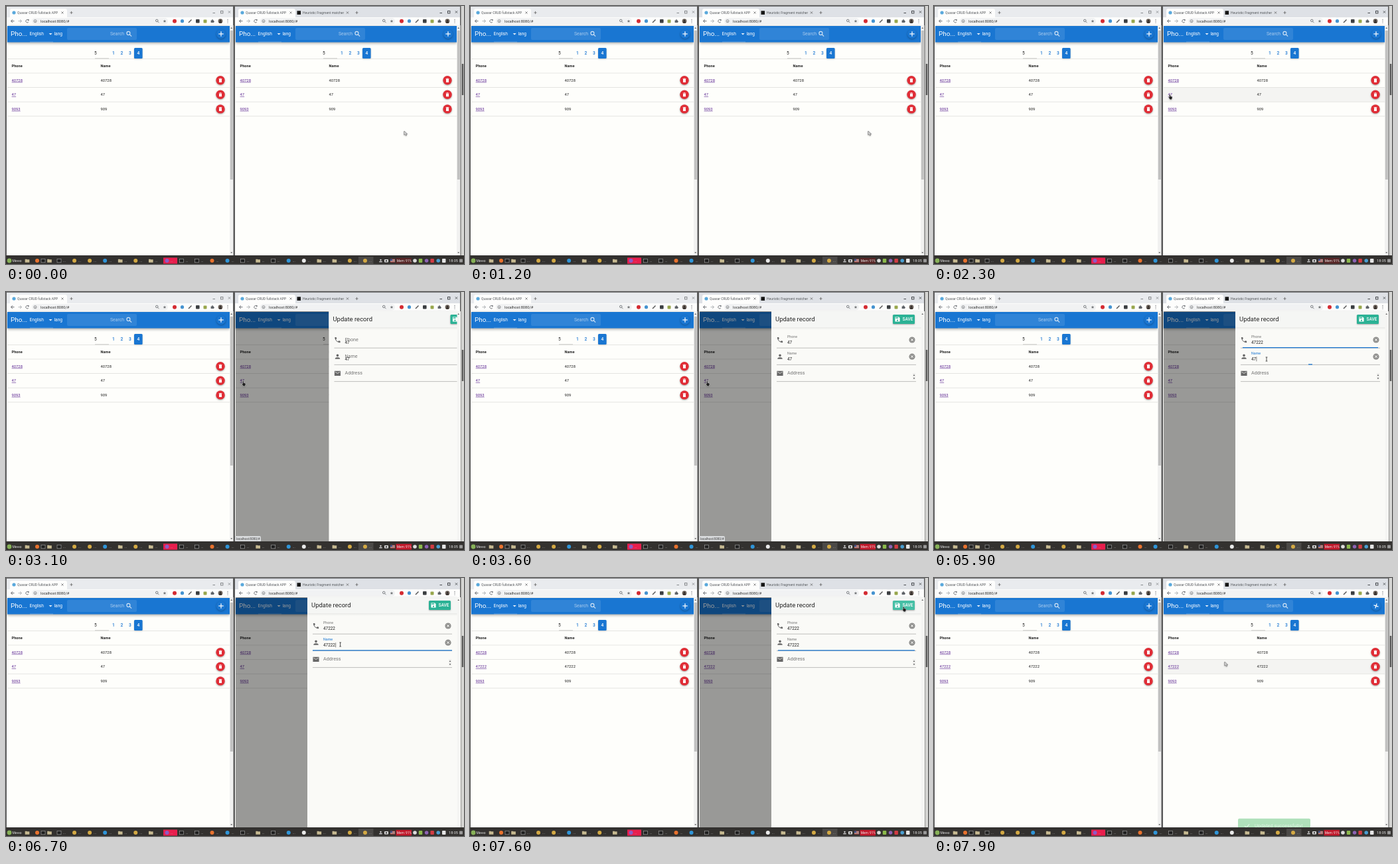
Animation of 690x388 px, one loop 8000 ms. Source, as an HTML page with a canvas:

```html
<!DOCTYPE html>
<html lang="en">
<head>
<meta charset="utf-8">
<title>CRUD demo</title>
<style>
  html, body { margin: 0; width: 100%; height: 100%; overflow: hidden; background: #33312f; }
  canvas { display: block; width: 690px; height: 388px; }
</style>
</head>
<body>
<canvas id="stage"></canvas>
<script>
const W = 690, H = 388, LOOP = 8000;
const BLUE = '#1976d2', PAPER = '#fefefb', DRAWER = '#fafaf7', RED = '#e02d36', GREY = '#757575', DIM = '#646464';
const canvas = document.getElementById('stage');
const c = canvas.getContext('2d');
const dpr = window.devicePixelRatio || 1;
canvas.width = W * dpr;
canvas.height = H * dpr;

const ICONS = {
  trash: 'M6 7h12v14H6zM5 4h3.5l1-1h5l1 1H19v2H5z',
  phone: 'M3 4q0-1 1-1h3.5q1 0 1 1 0 2 .6 3.6 .3 .6-.3 1l-2.2 2.2q2.2 4.4 6.6 6.6l2.2-2.2q.5-.5 1-.3 1.7 .6 3.6 .6 1 0 1 1V20q0 1-1 1C11 21 3 13 3 4z',
  person: 'M8 8a4 4 0 1 0 8 0 4 4 0 1 0-8 0zM4 20v-2c0-5 16-5 16 0v2z',
  mail: 'M2 4h20v16H2zM4 6v2l8 5 8-5V6l-8 5z',
  save: 'M3 3h14l4 4v14H3zM5 5v4h10V5zM9 16a3 3 0 1 0 6 0 3 3 0 1 0-6 0z',
  star: 'M12 3l2.7 6 6.6.7-5 4.4 1.5 6.4L12 17l-5.8 3.5 1.5-6.4-5-4.4 6.6-.7z',
  puzzle: 'M3 8h6V6a3 3 0 0 1 6 0v2h5v5a3 3 0 0 1 0 6v2H3z',
  folder: 'M2 5h8l2 2h10v13H2z',
  arrow: 'M0 0V15L3.7 11.6 6 17 8.6 15.8 6.2 10.6H11z',
  hand: 'M4 0q2 0 2 2v5l7 2v5l-2 5H5L0 11q1-2 3 0V2q0-2 1-2z'
};
for (const name in ICONS) ICONS[name] = new Path2D(ICONS[name]);

const clamp = v => Math.max(0, Math.min(1, v));
const ramp = (t, start, length) => clamp((t - start) / length);
const smooth = p => p * p * (3 - 2 * p);
const easeOut = p => 1 - (1 - p) ** 3;

function rect(x, y, w, h, color, r = 0) {
  c.fillStyle = color;
  c.beginPath();
  c.roundRect(x, y, w, h, r);
  c.fill();
}
function circle(x, y, r, color) {
  c.fillStyle = color;
  c.beginPath();
  c.arc(x, y, r, 0, 7);
  c.fill();
}
function stroke(points, color, width = 1) {
  c.strokeStyle = color;
  c.lineWidth = width;
  c.beginPath();
  points.forEach(([x, y]) => c.lineTo(x, y));
  c.stroke();
}
function ring(x, y, r, color, width = 0.8, from = 0, to = 7) {
  c.strokeStyle = color;
  c.lineWidth = width;
  c.beginPath();
  c.arc(x, y, r, from, to);
  c.stroke();
}
function text(s, x, y, size, color, weight = 400, align = 'left') {
  c.font = `${weight} ${size}px Roboto, sans-serif`;
  c.textAlign = align;
  c.textBaseline = 'middle';
  c.fillStyle = color;
  c.fillText(s, x, y + size * 0.04);
}
function icon(name, x, y, size, color) {
  c.save();
  c.translate(x - size / 2, y - size / 2);
  c.scale(size / 24, size / 24);
  c.fillStyle = color;
  c.fill(ICONS[name], 'evenodd');
  c.restore();
}
function shadowed(blur, alpha, draw) {
  c.save();
  c.shadowColor = `rgba(0,0,0,${alpha})`;
  c.shadowBlur = blur * dpr;
  c.shadowOffsetY = dpr;
  draw();
  c.restore();
}
function cross(x, y, r, color, width = 0.8) {
  stroke([[x - r, y - r], [x + r, y + r]], color, width);
  stroke([[x - r, y + r], [x + r, y - r]], color, width);
}
function plus(x, y, r, color, width) {
  stroke([[x - r, y], [x + r, y]], color, width);
  stroke([[x, y - r], [x, y + r]], color, width);
}
function magnifier(x, y, r, color, width) {
  ring(x - r * 0.3, y - r * 0.3, r * 0.7, color, width);
  stroke([[x + r * 0.2, y + r * 0.2], [x + r, y + r]], color, width);
}
function clipped(x, y, w, h, draw) {
  c.save();
  c.beginPath();
  c.rect(x, y, w, h);
  c.clip();
  draw();
  c.restore();
}

// Left-anchored parts shift by ox, right-anchored ones by rx.
function chrome(ox, rx, active) {
  const ink = active ? '#45484c' : '#85888b';
  rect(ox + 1, 0, 341 + rx - ox, 375, PAPER);
  rect(ox + 1, 1, 341 + rx - ox, 16, active ? '#dee1e6' : '#e9ebee');
  rect(ox + 1, 0, 341 + rx - ox, 1, '#77787a');
  rect(ox + 6, 4, 86, 14, '#fdfdfc', [3, 3, 0, 0]);
  circle(ox + 12, 10, 2.6, '#5aa9dc');
  text('Quasar CRUD fullstack APP', ox + 17, 10, 5, '#55585c');
  cross(ox + 85, 10, 1.6, '#777');
  if (active) {
    rect(438.5, 7.3, 5.6, 5.6, '#151515');
    clipped(447, 4, 62, 13, () => text('Heuristic Fragment matcher v', 447, 10, 5, '#55585c'));
    cross(514.5, 10, 1.6, DIM);
  }
  plus(active ? 528.5 : 98.5, 10, 2.1, DIM, 0.8);
  stroke([[rx + 311.5, 10.5], [rx + 315, 10.5]], ink);
  c.strokeRect(rx + 323.5, 7.5, 3.4, 3.4);
  cross(rx + 336.5, 9, 1.7, ink);

  rect(ox + 1, 17, 341 + rx - ox, 12, '#fdfdfc');
  [[10, -1, '#5f6368'], [21, 1, '#a8abae']].forEach(([x, d, color]) => {
    x += ox;
    stroke([[x - 2.5, 22.7], [x + 2.5, 22.7]], color, 0.9);
    stroke([[x, 20.3], [x + d * 2.5, 22.7], [x, 25.1]], color, 0.9);
  });
  ring(ox + 32, 22.7, 2.2, '#5f6368', 0.9, 0.5, 5.7);
  rect(ox + 32.9, 20.2, 1.7, 1.7, '#5f6368');
  rect(ox + 39, 18, 205 + rx - ox, 9.6, '#f1f2f3', 5);
  ring(ox + 44, 22.7, 2.1, '#6a6d70', 0.7);
  rect(ox + 43.7, 22, 0.7, 2, '#6a6d70');
  text('localhost:8080/#', ox + 52, 22.8, 5.7, '#333');
  magnifier(rx + 228, 22.7, 2.5, '#5f6368', 0.8);
  icon('star', rx + 239, 22.7, 6, '#77797c');
  circle(rx + 254, 22.7, 3, '#d42b32');
  circle(rx + 265.5, 22.7, 2.6, '#4593d0');
  stroke([[rx + 275, 25], [rx + 279.5, 20.5]], '#555', 1.4);
  rect(rx + 286, 20, 5.6, 5.6, '#3c3f42', 1);
  rect(rx + 297.5, 20.5, 5, 5, '#97a64c', 1);
  icon('puzzle', rx + 311, 22.5, 6.4, '#5f6368');
  circle(rx + 323, 22.7, 3.4, '#71675f');
  circle(rx + 323, 21.7, 1.2, '#302b28');
  rect(rx + 321, 23.3, 4, 2.2, '#302b28', 1);
  [20.4, 22.7, 25].forEach(y => circle(rx + 334, y, 0.6, '#5f6368'));
}

function page(ox, rx, rows, hovered, spin, scrollbar) {
  const left = ox + 2, width = 335 + rx - ox;
  shadowed(4, 0.35, () => rect(left, 30, width, 24.5, BLUE));
  text('Pho...', ox + 7, 42, 9.9, '#fff');
  text('English', ox + 35.5, 42, 6.6, '#fff');
  stroke([[ox + 36, 54], [ox + 71, 54]], 'rgba(255,255,255,.45)', 0.6);
  c.fillStyle = '#e6eff9';
  c.beginPath();
  c.moveTo(ox + 64.6, 41); c.lineTo(ox + 69.6, 41); c.lineTo(ox + 67.1, 43.6);
  c.fill();
  text('lang', ox + 72.5, 42, 6.6, '#fff');
  rect(ox + 92, 33, 105, 18, 'rgba(255,255,255,.1)', 2);
  text('Search', ox + 157, 42, 6.9, '#a9cbed');
  magnifier(ox + 185.5, 42, 3.6, '#d6e6f6', 1.1);
  shadowed(3, 0.3, () => circle(rx + 324, 42, 7, BLUE));
  c.save();
  c.translate(rx + 324, 42);
  c.rotate(spin);
  plus(0, 0, 3.7, '#fff', 1.2);
  c.restore();

  text('5', ox + 133, 71, 6.5, '#222');
  stroke([[ox + 134, 79], [ox + 155, 79]], '#9b9b99', 0.7);
  ['1', '2', '3'].forEach((n, i) => text(n, ox + 161.8 + i * 12.5, 71, 6.7, BLUE, 500, 'center'));
  shadowed(2, 0.25, () => rect(ox + 193, 63, 12.6, 16, BLUE, 1.5));
  text('4', ox + 199.3, 71, 6.7, '#fff', 500, 'center');

  text('Phone', ox + 8.6, 90, 5.6, '#222', 700);
  text('Name', ox + 142.6, 90, 5.6, '#222', 700);
  rows.forEach(([phone, name], i) => {
    const y = 111.7 + i * 21.6;
    if (i === hovered) rect(left, y - 10.8, width, 21.6, '#f4f4f2');
    text(phone, ox + 8.6, y, 5.8, '#5a2391');
    const w = c.measureText(phone).width;
    stroke([[ox + 8.6, y + 3.1], [ox + 8.6 + w, y + 3.1]], '#5a2391', 0.6);
    text(name, ox + 142.6, y, 5.8, '#222');
    shadowed(2.5, 0.35, () => circle(rx + 323, y, 6.7, RED));
    icon('trash', rx + 323, y, 8, '#fff');
  });
  [79.5, 101, 122.5, 144.2, 165.7].forEach(y => stroke([[left, y], [left + width, y]], '#dcdcd9', 0.7));
  if (scrollbar) {
    rect(rx + 337, 29, 5.5, 346, '#f1f1f0');
    rect(rx + 337.8, 37, 4, 224, '#c1c1c0');
    scrollArrow(rx + 339.7, 33, -1);
    scrollArrow(rx + 339.7, 371, 1);
  }
}
function scrollArrow(x, y, d) {
  c.fillStyle = DIM;
  c.beginPath();
  c.moveTo(x - 1.4, y - d); c.lineTo(x + 1.4, y - d); c.lineTo(x, y + d);
  c.fill();
}

function field(x, y, glyph, label, value, floated, focused, line) {
  icon(glyph, x + 13, y, 11, '#686868');
  const f = value ? floated : 0;
  text(label, x + 24, y - 0.7 - 4.2 * f, 7.2 - 1.9 * f, focused ? BLUE : GREY);
  if (value) {
    text(value, x + 24, y + 3.7, 6.4, '#222');
    circle(x + 212, y, 4.6, '#929290');
    cross(x + 212, y, 1.7, DRAWER, 1);
  }
  stroke([[x + 8, y + 12.2], [x + 218, y + 12.2]], '#a5a5a2', 0.7);
  if (line > 0) stroke([[x + 113 - 105 * line, y + 11.7], [x + 113 + 105 * line, y + 11.7]], BLUE, 1.3);
}

function drawer(t, offset, phone, name) {
  const x = 454 + offset;
  const floated = smooth(ramp(t, 3120, 300));
  const swap = smooth(ramp(t, 5865, 360));
  const phoneFocus = t >= 4140 && t < 5865, nameFocus = t >= 5865 && t < 7570;
  rect(x, 29, 231, 346, DRAWER);
  rect(x, 29, 231, 24, '#f5f6f4');
  const shade = c.createLinearGradient(0, 53, 0, 57);
  shade.addColorStop(0, '#e9eae7');
  shade.addColorStop(1, DRAWER);
  rect(x, 53, 231, 4, shade);
  text('Update record', x + 6, 41, 9.5, '#222');
  const overSave = t > 7200;
  shadowed(2, 0.3, () => rect(x + 183, 34, 33, 14, overSave ? '#45bfa5' : '#2bb295', 1.5));
  icon('save', x + 190, 41, 9.5, '#fff');
  text('SAVE', x + 197.5, 41, 6.5, '#fff', 500);
  field(x, 72, 'phone', 'Phone', phone, floated, phoneFocus, smooth(ramp(t, 4140, 340)) - swap);
  field(x, 97.2, 'person', 'Name', name, floated, nameFocus, swap - smooth(ramp(t, 7570, 360)) * 0.9);
  field(x, 122.4, 'mail', 'Address', '', 0, false, 0);
  rect(x + 213, 122, 4, 10, '#efefed');
  scrollArrow(x + 215, 125, -1);
  scrollArrow(x + 215, 130, 1);
  if (phoneFocus || nameFocus) {
    const value = phoneFocus ? phone : name, y = phoneFocus ? 75.6 : 100.8;
    c.font = '400 6.4px Roboto, sans-serif';
    const caret = x + 24.7 + c.measureText(value).width;
    stroke([[caret, y - 3.5], [caret, y + 3.5]], '#333', 0.6);
  }
  rect(679.5, 29, 5.5, 346, '#f5f5f3');
  scrollArrow(681.7, 33, -1);
}

function taskbar(t) {
  rect(0, 375, W, 13, '#33312f');
  circle(5, 383, 3.4, '#87b158');
  text('Меню', 9.5, 383, 5, '#ddd');
  const app = (x, kind) => {
    const color = { g: '#d3a944', o: '#e8722e', b: '#2f95d8', w: '#e9e9e9' }[kind];
    if (kind === 'f') icon('folder', x, 383, 8, '#c6b991');
    else if (kind === 't') {
      rect(x - 3, 380.3, 6, 5.5, '#202020', 0.6);
      c.strokeStyle = '#aaa';
      c.lineWidth = 0.6;
      c.strokeRect(x - 3, 380.3, 6, 5.5);
    } else circle(x, 383, 3, color);
  };
  [...'fotf'].forEach((kind, i) => app([32, 47, 56, 65.5][i], kind));
  rect(237, 378.5, 21, 9, '#e91e4d');
  rect(531, 377, 22.5, 11, '#4b4947');
  [...'tggbfgf ttobtftbwffgg'].forEach((kind, i) => {
    const x = 80 + i * 23.05;
    if (kind === ' ') circle(242.5, 383, 3, '#8e5bc4');
    else app(x, kind);
    text('...', x + 6, 383, 5, '#bbb');
  });
  icon('person', 564.5, 383, 7, '#ddd');
  rect(570, 381, 6, 4.4, '#ddd', 1);
  circle(573, 383.2, 1.3, '#444');
  [0, 1, 2, 3, 4].forEach(i => rect(579, 380.5 + i, 7, 1, i % 2 ? '#eee' : '#c74545'));
  rect(579, 380.5, 3, 2.5, '#3b4f8a');
  rect(587.5, 378.8, 23.5, 8.6, t < 2700 ? '#582626' : '#c2182b');
  text('Mem: 91%', 588.8, 383, 4.8, '#eee');
  ['#ddd', '#8bb94b', '#8c63b5', '#d13c43', '#4a9fd2', '#e4e4e4'].forEach((color, i) => {
    if (i % 2) rect(613 + i * 8.8, 380, 5.5, 6, color, 1);
    else circle(616 + i * 8.8, 383, 2.8, color);
  });
  text('18:05', 667, 383, 5.6, '#e4e4e4');
  rect(683, 380.5, 5, 5, '#999', 0.6);
}

const PATH = [
  [0, 600, 188], [1200, 600, 188], [2000, 355, 133], [2700, 355, 133], [2900, 357, 134],
  [3800, 357, 134], [4200, 505, 77], [5350, 505, 77], [5750, 501, 101], [6650, 501, 101],
  [7300, 653, 43], [7600, 653, 43], [7900, 438, 126], [8001, 438, 126]
];
function pointer(t) {
  const i = PATH.findIndex(key => key[0] > t);
  const [t0, x0, y0] = PATH[i - 1], [t1, x1, y1] = PATH[i];
  const p = smooth((t - t0) / (t1 - t0));
  return [x0 + (x1 - x0) * p, y0 + (y1 - y0) * p];
}
function cursor(x, y, kind) {
  if (kind === 'beam') {
    stroke([[x, y - 3], [x, y + 3]], '#222', 0.8);
    [-3, 3].forEach(d => stroke([[x - 1.4, y + d], [x + 1.4, y + d]], '#222', 0.7));
    return;
  }
  c.save();
  c.translate(x - (kind === 'hand' ? 1.5 : 0), y);
  c.scale(0.4, 0.4);
  c.lineWidth = 2;
  c.strokeStyle = kind === 'hand' ? '#eee' : '#444';
  c.fillStyle = kind === 'hand' ? '#222' : '#c8c8c8';
  shadowed(2, 0.35, () => c.stroke(ICONS[kind]));
  c.fill(ICONS[kind]);
  c.restore();
}

function typed(t, start) {
  const count = Math.max(0, Math.min(3, Math.floor((t - start) / 150) + 1));
  return '47' + '222'.slice(0, count);
}

function draw(t) {
  c.setTransform(dpr, 0, 0, dpr, 0, 0);
  rect(0, 0, W, H, '#5a5a5a');
  const [x, y] = pointer(t);
  const open = t >= 2920 && t < 7820;
  const saved = t >= 7590 ? '47222' : '47';
  const rows = [['40728', '40728'], [saved, saved], ['9093', '909']];
  const row = Math.floor((y - 100.9) / 21.6);
  const hovered = !open && row >= 0 && row < 3 ? row : -1;

  chrome(0, 0, false);
  page(0, 0, rows, -1, 0, true);
  chrome(344, 342, true);
  page(344, 342, rows, hovered, ramp(t, 7820, 300) * 1.2, !open);

  if (open) {
    const shade = 0.4 * Math.min(ramp(t, 2900, 120), 1 - ramp(t, 7640, 180));
    const offset = 226 * (1 - easeOut(ramp(t, 2920, 380)) + smooth(ramp(t, 7620, 190)));
    clipped(346, 29, 339, 346, () => {
      rect(346, 29, 339, 346, `rgba(0,0,0,${shade})`);
      drawer(t, offset, typed(t, 4950), typed(t, 6150));
    });
  }
  if (t >= 2400 && t < 3850) {
    rect(345, 367, 39, 8, '#d9dbdd', [0, 2, 0, 0]);
    text('localhost:8080/#', 347, 371.2, 4.7, '#444');
  }
  if (t >= 7800) {
    const top = 375 - 26 * ramp(t, 7800, 200);
    clipped(346, 29, 333, 346, () => {
      c.globalAlpha = 0.25 + 0.7 * ramp(t, 7800, 200);
      rect(458, top, 109, 22, '#7fcf92', 2);
      stroke([[468, top + 11], [470.5, top + 13.5], [475, top + 8.5]], '#fff', 1.2);
      text('Updated successfully!', 483, top + 11, 7.4, '#fff');
      c.globalAlpha = 1;
    });
  }

  rect(685, 0, 5, 375, '#d5d5d3');
  rect(685, 0, 0.8, 375, '#858585');
  rect(686.8, 87, 2.4, 47, '#555');
  taskbar(t);

  const onLink = (hovered === 1 && x < 370) || (open && t < 3800);
  const onSave = open && x > 637 && x < 670 && y > 34 && y < 48;
  const onField = open && x > 476 && x < 660 && y > 62 && y < 108;
  cursor(x, y, onLink || onSave ? 'hand' : onField ? 'beam' : 'arrow');
}

const begin = performance.now();
function tick() {
  draw((performance.now() - begin) % LOOP);
  requestAnimationFrame(tick);
}
tick();
</script>
</body>
</html>
```
